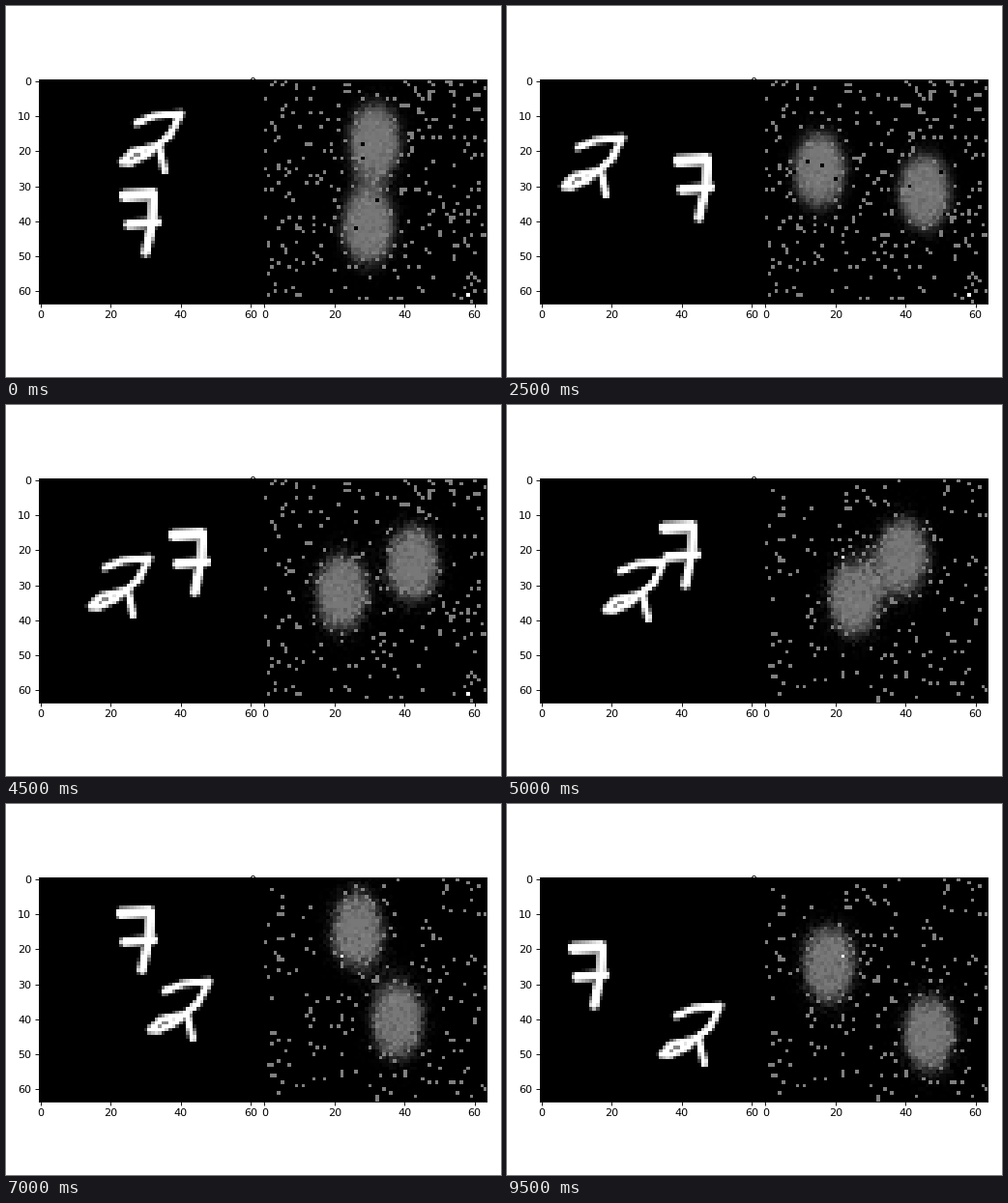
These frames come from a looping animation (512x384 px, 10000 ms). A matplotlib script:

```python
import numpy as np
import matplotlib.pyplot as plt
from matplotlib.animation import FuncAnimation

W, H, DPI = 512, 384, 80
FRAMES, SIZE = 20, 64
LEFT, SIDE = 34, 231.6
CLEAR = 9    # from here some specks vanish
RESEED = 10  # from here the specks are new

# Pen strokes inside a 28 x 28 box: (radius, points)
SEVEN = [
    (1.65, [(9.6, 9.2), (17.4, 8.8)]),
    (1.25, [(17.7, 8.8), (17.5, 16), (15.5, 25.4)]),
    (1.35, [(10.6, 17.4), (18.6, 16.8)]),
]
TWO = [
    (1, [(9.9, 8.5), (15, 6.4), (22.5, 5.7), (19.5, 11.8), (12.7, 17.6),
         (8, 19.8), (5.8, 19.6), (8.5, 16.7), (16.3, 14.9)]),
    (1, [(16.3, 14.8), (17.9, 22)]),
]

rows, cols = np.mgrid[0:SIZE, 0:SIZE]


def stroke_distance(x, y, points):
    best = np.full(x.shape, np.inf)
    for (ax, ay), (bx, by) in zip(points, points[1:]):
        dx, dy = bx - ax, by - ay
        s = np.clip(((x - ax) * dx + (y - ay) * dy) / (dx * dx + dy * dy), 0, 1)
        best = np.minimum(best, np.hypot(x - ax - s * dx, y - ay - s * dy))
    return best


def render_glyph(strokes):
    y, x = np.mgrid[0:28, 0:28] + 0.5
    layers = [np.clip(1.2 * (r + 0.45 - stroke_distance(x, y, p)), 0, 1) for r, p in strokes]
    return np.max(layers, axis=0)


def bounce(start, speed, low=0, high=36):
    """Positions of a walk that stops at a wall for one frame and turns round."""
    pos, path = start, []
    for _ in range(FRAMES):
        path.append(pos)
        pos += speed
        if not low <= pos <= high:
            pos = min(max(pos, low), high)
            speed = -speed
    return np.array(path)


# Digits: glyph and whole-cell path of its box
DIGITS = [
    (render_glyph(SEVEN), bounce(15.4, 3.05).astype(int), bounce(24.2, -1.9).astype(int)),
    (render_glyph(TWO), bounce(18, -3.31).astype(int), bounce(4.35, 1.41).astype(int)),
]
# Estimates follow the digits loosely: path of the blob centre
BLOBS = [
    (13.8 + bounce(16.2, 3.15, 1.5, 35.2), 16.5 + bounce(25.5, -1.97, -1.5)),
    (13.8 + bounce(18, -3.2, -1, 36.5), 13.3 + bounce(4.35, 1.65, high=33)),
]

rng = np.random.default_rng(11)


def scatter(density):
    return rng.random((SIZE, SIZE)) < density


EARLY, LATE, HOLES = scatter(0.08), scatter(0.054), scatter(0.01)
THINNED = EARLY & (scatter(0.72) | (rows < 8))


def digits_image(t):
    image = np.zeros((SIZE, SIZE))
    for glyph, xs, ys in DIGITS:
        area = image[ys[t]:ys[t] + 28, xs[t]:xs[t] + 28]
        np.maximum(area, glyph, out=area)
    return image


def blob_strength(t):
    """Summed soft ellipses, so that near blobs melt together."""
    field = sum(np.exp(-((cols + 0.5 - xs[t]) / 7) ** 2 - ((rows + 0.5 - ys[t]) / 10.2) ** 2)
                for xs, ys in BLOBS)
    reach = np.sqrt(np.maximum(-np.log(field + 1e-9), 0))
    return 1 / (1 + np.exp(8 * (reach - 1)))


def estimate_image(t):
    noise = np.random.default_rng(100 + t).normal(size=(SIZE, SIZE))
    grain = 0.14 if t < CLEAR else 0.22
    p = blob_strength(t)
    image = 0.47 * np.clip(p + grain * noise * np.sqrt(p * (1.15 - p)), 0, 1)
    image[EARLY if t < CLEAR else THINNED if t < RESEED else LATE] = 0.5
    if t < CLEAR:
        image[HOLES] = 0
    image[(61, 58) if t < RESEED else (22, 22)] = 1
    return image


fig = plt.figure(figsize=(W / DPI, H / DPI), dpi=DPI, facecolor="white")


def add_panel(left):
    ax = fig.add_axes([left / W, (H - SIDE) / 2 / H, SIDE / W, SIDE / H])
    picture = ax.imshow(np.zeros((SIZE, SIZE)), cmap="gray", vmin=0, vmax=1,
                        interpolation="nearest", aspect="auto")
    ax.set_xticks(range(0, SIZE, 20))
    ax.set_yticks(range(0, SIZE, 10))
    ax.tick_params(axis="x", pad=2.6)
    return picture


left_picture = add_panel(LEFT)
right_picture = add_panel(LEFT + SIDE)


def update(t):
    left_picture.set_data(digits_image(t))
    right_picture.set_data(estimate_image(t))
    return left_picture, right_picture


anim = FuncAnimation(fig, update, frames=FRAMES, interval=500, repeat=True, repeat_delay=0)
plt.show()
```
